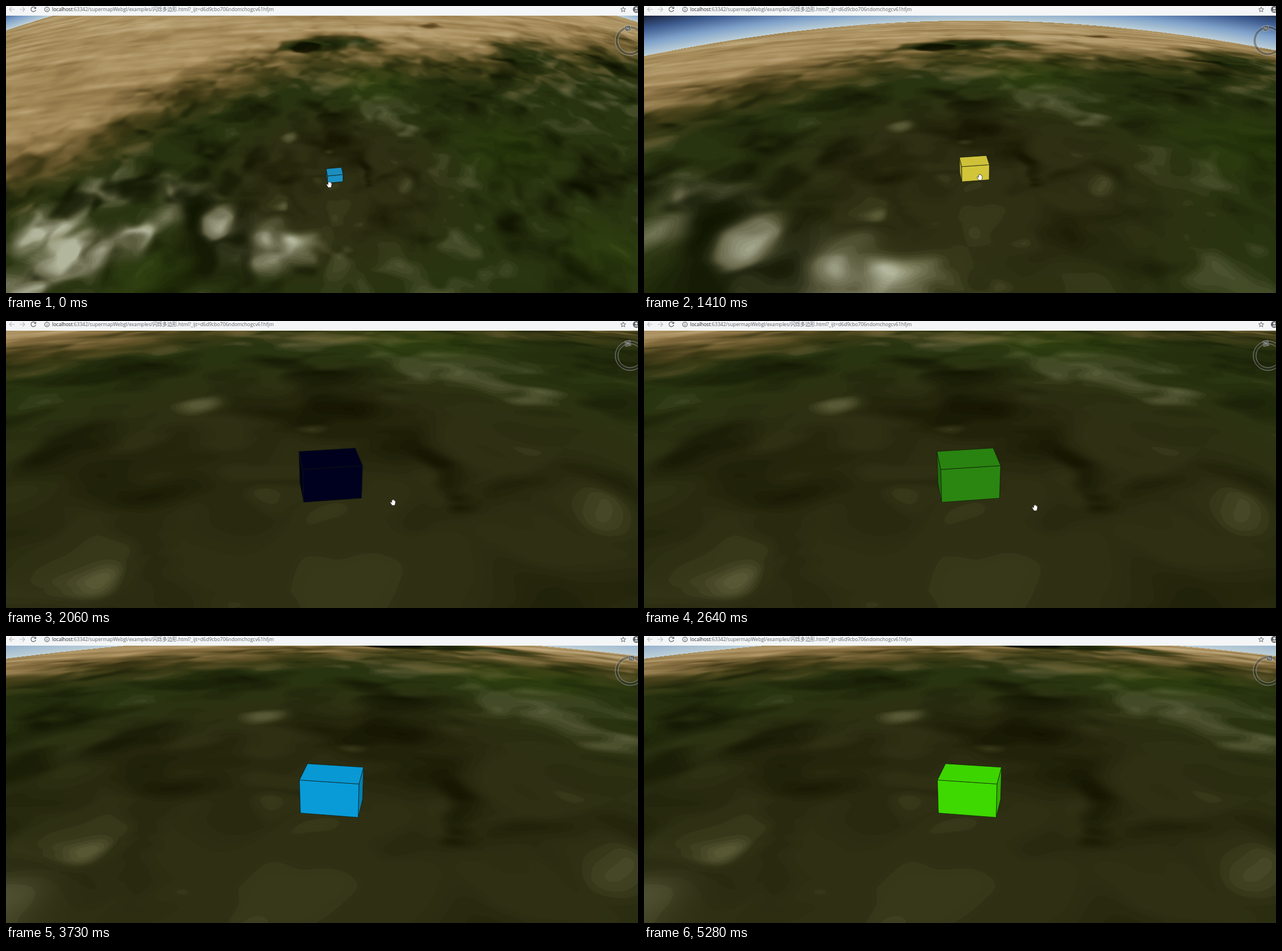
These frames come from a looping animation (1110x505 px, 5.38 s). An HTML page with a canvas:

```html
<!DOCTYPE html>
<html lang="zh">
<head>
<meta charset="utf-8">
<title>闪烁多边形</title>
<style>
  html, body { margin: 0; width: 100%; height: 100%; overflow: hidden; background: #000; }
  canvas, svg { position: absolute; left: 0; top: 0; display: block; }
  canvas { top: 17px; }
  text { font-family: "Open Sans", "Noto Sans", "Noto Sans CJK SC", "Noto Sans CJK", sans-serif; }
</style>
</head>
<body>
<canvas id="globe" width="1110" height="488"></canvas>
<svg width="1110" height="505" viewBox="0 0 1110 505">
  <g fill="none" stroke="#d4d6d2" stroke-opacity=".55">
    <circle cx="1096" cy="61" r="23.5" stroke="#303532" stroke-width="5" stroke-opacity=".4"/>
    <circle cx="1096" cy="61" r="26"/>
    <circle cx="1096" cy="61" r="21"/>
    <g id="north">
      <rect x="1091.5" y="34.5" width="9" height="9" fill="#454a47" fill-opacity=".85"/>
      <text x="1096" y="42" font-size="8" text-anchor="middle" fill="#f0f0f0" stroke="none">N</text>
    </g>
  </g>

  <g id="box" stroke="#10180c" stroke-width=".7" stroke-linejoin="round"></g>

  <g id="tilt" transform="translate(568 306)" fill="none" stroke="#c2c6b4" stroke-width="1.3">
    <ellipse rx="10.5" ry="4.5"/>
    <path d="M0 -6V6M-2 -4L0 -6.5L2 -4M-2 4L0 6.5L2 4M-8 -1l-3 1l3 2M8 -1l3 1l-3 2"/>
  </g>
  <path id="hand" fill="#fff" stroke="#222" stroke-width=".7" stroke-linejoin="round"
    d="M-4 -1L-2.4 .6V-3.6Q-1.6 -4.8 -.8 -3.6V-4.6Q0 -5.8 .8 -4.6V-3.8Q1.6 -4.8 2.4 -3.6V-2.4Q3.4 -3.2 4 -2V1Q3.6 4 2.4 5.6H-2Q-3.2 3.4 -5 .6Q-5.2 -1 -4 -1Z"/>

  <rect width="1110" height="17" fill="#f3f5f6"/>
  <g fill="none" stroke="#b7babd" stroke-width="1.1">
    <path d="M15 6H6M10 2L6 6L10 10M24 6H33M29 2L33 6L29 10"/>
    <g stroke="#54585c">
      <path d="M51.4 3.2A4.2 4.2 0 1 0 52.2 6.8M52.4 1.5V4.4H49.4"/>
      <circle cx="72" cy="6" r="4"/>
      <path d="M72 5.4V8.3M72 3.4V4.4"/>
      <path stroke-width=".9" d="M1084 1.8L1085.2 4.8L1088.4 5L1086 7.1L1086.8 10.2L1084 8.5L1081.2 10.2L1082 7.1L1079.6 5L1082.8 4.8Z"/>
    </g>
  </g>
  <circle cx="1107" cy="6" r="6" fill="#5f6368"/>
  <circle cx="1107" cy="4.3" r="2" fill="#f3f5f6"/>
  <path d="M1103 9.4Q1107 5.6 1111 9.4Z" fill="#f3f5f6"/>
  <text x="81" y="9" font-size="8.6" fill="#5f6368"><tspan fill="#202124">localhost</tspan>:63342/supermapWebgl/examples/闪烁多边形.html?_ijt=d6d9cbo706ndomchogcv61hfjm</text>
</svg>

<script>
const W = 1110, H = 488, TOP = 17, FOCAL = 984, LOOP = 5380;
const $ = id => document.getElementById(id);
const clamp = v => v < 0 ? 0 : v > 1 ? 1 : v;
const mix = (a, b, f) => a + (b - a) * f;

// The picture changes on these beats only; each track is read at the latest beat.
const beats = [0, 1150, 1410, 1720, 2060, 2360, 2640, 2940, 3200, 3460, 3730, 3980, 4230, 4500, 4750, 5030, 5280];

// time, box x, box y, distance in globe radii, tilt, heading
const flight = [
  [0, 577, 304, .227, 47, 0],
  [1150, 577, 305, .227, 59.1, 0],
  [1410, 580, 299, .128, 59.4, 0],
  [2060, 569, 298, .0613, 60.5, 0],
  [2640, 569, 298, .0613, 60.5, 0],
  [2940, 571, 299, .0613, 62, 12],
  [3200, 573, 299, .0613, 62.3, 17]
];
// time, red, green, blue
const flash = [
  [0, 28, 145, 196], [1150, 169, 210, 100], [1410, 210, 197, 58], [2060, 0, 0, 31],
  [2940, 63, 203, 9], [3730, 8, 155, 216], [5280, 62, 217, 0]
];
// time, x, y
const drag = [
  [0, 568, 314], [1150, 568, 314], [1410, 590, 301], [2060, 680, 319],
  [2360, 727, 322], [2940, 644, 335], [3460, 958, 491]
];
function read(track, t) {
  const next = track.findIndex(key => key[0] > t);
  if (next < 0) return track[track.length - 1].slice(1);
  const a = track[next - 1], b = track[next], f = (t - a[0]) / (b[0] - a[0]);
  return a.slice(1).map((v, i) => mix(v, b[i + 1], f));
}

function cameraAt(t) {
  const [x, y, dist, tilt, heading] = read(flight, t);
  const a = tilt * Math.PI / 180, b = heading * Math.PI / 180;
  return { x, y, dist, heading, st: Math.sin(a), ct: Math.cos(a), sh: Math.sin(b), ch: Math.cos(b) };
}

// Casts a ray; sets gx, gy (hundredths of a radius) and returns -1, or returns the height above the limb.
let gx = 0, gy = 0;
function cast(v, x, y) {
  const dx = x - v.x, up = v.y - y;
  const dy = FOCAL * v.st + up * v.ct, dz = up * v.st - FOCAL * v.ct;
  const cy = -v.dist * v.st, cz = 1 + v.dist * v.ct;
  const a = dx * dx + dy * dy + dz * dz, b = cy * dy + cz * dz;
  const c = v.dist * (v.dist + 2 * v.ct), disc = b * b - a * c;
  if (disc < 0) return Math.sqrt(1 + c - b * b / a) - 1;
  const s = (-b - Math.sqrt(disc)) / a;
  const px = 100 * s * dx, py = 100 * (cy + s * dy);
  gx = px * v.ch - py * v.sh;
  gy = px * v.sh + py * v.ch;
  return -1;
}

// Inverse of cast for points near the box
function project(v, X, Y, Z) {
  const x = (X * v.ch + Y * v.sh) / 100;
  const y = (Y * v.ch - X * v.sh) / 100 + v.dist * v.st, z = Z / 100 - v.dist * v.ct;
  const k = FOCAL / (y * v.st - z * v.ct);
  return [v.x + k * x, v.y - k * (y * v.ct + z * v.st)];
}

let seed = 4711;
const random = () => (seed = (Math.imul(seed, 1664525) + 1013904223) >>> 0) / 4294967296;
const lattice = Float32Array.from({ length: 65536 }, () => random() * 2 - 1);
function noise(x, y) {
  const ix = Math.floor(x), iy = Math.floor(y);
  let fx = x - ix, fy = y - iy;
  fx *= fx * (3 - 2 * fx);
  fy *= fy * (3 - 2 * fy);
  const x0 = ix & 255, x1 = (ix + 1) & 255, r0 = (iy & 255) << 8, r1 = ((iy + 1) & 255) << 8;
  return mix(mix(lattice[r0 + x0], lattice[r0 + x1], fx), mix(lattice[r1 + x0], lattice[r1 + x1], fx), fy);
}

// Landmarks are round on the ground and placed in the screen space of one view.
const RELIEF = 0, SAND = 1, RIDGE = 2, LUSH = 3;
const land = [];
function spot(view, kind, x, y, r, amount) {
  cast(view, x + r, y);
  const ex = gx, ey = gy;
  cast(view, x, y);
  land.push({ kind, cx: gx, cy: gy, r: Math.hypot(ex - gx, ey - gy), amount });
}
// Beads along a quadratic curve
function chain(view, kind, [x0, y0], [x1, y1], [x2, y2], r, amount) {
  for (let f = 0; f <= 1; f += .125) {
    const x = mix(mix(x0, x1, f), mix(x1, x2, f), f), y = mix(mix(y0, y1, f), mix(y1, y2, f), f);
    spot(view, kind, x, y, r * (.75 + .5 * random()), amount);
  }
}
const wide = cameraAt(0), near = cameraAt(LOOP);
spot(wide, RELIEF, 525, 72, 32, -1.2);
spot(wide, RELIEF, 745, 36, 24, -.5);
spot(wide, RELIEF, 702, 312, 32, .3);
spot(wide, RELIEF, 820, 180, 110, -.12);
spot(near, RELIEF, 592, 196, 34, .3);
spot(near, RELIEF, 462, 140, 60, .35);
spot(near, RELIEF, 478, 297, 55, .2);
spot(near, RELIEF, 105, 385, 80, .3);
chain(near, RELIEF, [750, 250], [830, 290], [820, 370], 55, -.14);
chain(near, RELIEF, [400, 175], [230, 300], [230, 480], 70, -.09);
chain(wide, SAND, [490, 72], [570, 60], [640, 66], 45, -.9);
spot(wide, SAND, 915, 84, 80, -1.5);
chain(wide, RIDGE, [60, 400], [150, 290], [330, 325], 60, .6);
chain(wide, RIDGE, [320, 335], [350, 410], [490, 430], 75, .7);
chain(wide, RIDGE, [20, 495], [100, 440], [230, 410], 60, .6);
spot(wide, LUSH, 645, 132, 100, .8);
spot(wide, LUSH, 880, 250, 130, .8);
spot(wide, LUSH, 1060, 430, 120, .7);
spot(wide, LUSH, 250, 485, 110, .8);

// Dark, middle and light tone of each ground cover
const tones = {
  green: [[14, 18, 0], [41, 52, 16], [128, 128, 92]],
  olive: [[20, 20, 0], [48, 48, 20], [128, 126, 84]],
  lush: [[20, 32, 2], [48, 66, 15], [84, 108, 48]],
  earth: [[46, 36, 10], [98, 80, 36], [172, 138, 84]],
  sand: [[92, 70, 32], [164, 137, 88], [218, 202, 164]],
  ridge: [[24, 30, 10], [96, 95, 66], [178, 182, 156]]
};
const MID = .45;
const tone = ([lo, mid, hi], h, i) =>
  h < MID ? mix(lo[i], mid[i], h / MID) : mix(mid[i], hi[i], (h - MID) / (1 - MID));

const sum = new Float64Array(4);
const cover = new Float64Array(5);
const covers = [tones.olive, tones.lush, tones.earth, tones.sand, tones.ridge];
function groundColour(out, o) {
  const X = gx + .25 * noise(gx / .7 + 40, gy / .7), Y = gy + .25 * noise(gx / .7, gy / .7 + 80);
  const n = .35 * noise(X / 2.4, Y / 2.4) + .45 * noise(X / 1.1 + 31, Y / 1.1)
    + .25 * noise(X / .5, Y / .5 + 57);
  sum.fill(0);
  for (const b of land) {
    const dx = X - b.cx, dy = Y - b.cy, q = 1 - (dx * dx + dy * dy) / (b.r * b.r);
    if (q > 0) sum[b.kind] += b.amount * q * q;
  }
  const west = Math.max(0, -gx - 2), east = Math.max(0, gx - 9);
  const dry = (gy - 8.5 + .8 * west - .5 * east) / 2.5 + n + sum[SAND];
  const arid = clamp(dry), ridge = clamp(sum[RIDGE] * (.8 + 1.2 * n));
  cover[0] = .9 * clamp(1.3 - (gx * gx + gy * gy) / 25);
  cover[1] = clamp(sum[LUSH]);
  cover[2] = clamp(dry * .5 + .25);
  cover[3] = clamp(dry * .6 - .4);
  cover[4] = ridge;

  // Level plains with separate dark and light patches
  const patch = Math.sign(n) * Math.max(0, Math.abs(n) - .07);
  let h = .42 + mix(patch * .5, n * .12, arid) + ridge * (.16 + .7 * n) + sum[RELIEF];
  h += arid * (.13 * noise(gx / 4, gy / .6) + .06 * noise(gx / 1.2, gy / .3) + .1 * clamp((gy - 5) / 8));
  h = clamp(mix(Math.round(h * 18) / 18, h, .2 + .6 * arid));
  for (let i = 0; i < 3; i++) {
    let c = tone(tones.green, h, i);
    for (let k = 0; k < 5; k++) if (cover[k]) c = mix(c, tone(covers[k], h, i), cover[k]);
    out[o + i] = c;
  }
}

const air = [[0, 190, 208, 215], [.007, 126, 161, 202], [.014, 60, 90, 142], [.02, 25, 34, 58], [.03, 0, 0, 0]];
function skyColour(out, o, alt) {
  let k = 1;
  while (k < air.length - 1 && alt > air[k][0]) k++;
  const a = air[k - 1], b = air[k], f = clamp((alt - a[0]) / (b[0] - a[0]));
  for (let i = 1; i < 4; i++) out[o + i - 1] = mix(a[i], b[i], f);
}

const stars = Array.from({ length: 14 }, () => {
  const side = random() * 2 - 1;
  return [555 + 555 * side, 22 + random() * (10 + 70 * side * side), 1 + random()];
});

const pen = $("globe").getContext("2d");
const shots = new Map();
function shoot(t) {
  const id = read(flight, t).join();
  if (shots.has(id)) return shots.get(id);
  const view = cameraAt(t), img = pen.createImageData(W, H), out = img.data;
  for (let y = 0, o = 0; y < H; y++) {
    for (let x = 0; x < W; x++, o += 4) {
      const alt = cast(view, x, y + TOP);
      if (alt < 0) groundColour(out, o);
      else skyColour(out, o, alt);
      out[o + 3] = 255;
    }
  }
  shots.set(id, img);
  return img;
}

// Box on the ground: half width, half depth, height, and its turn
const BOX = { w: .31, d: .215, h: .39, turn: 8 * Math.PI / 180 };
function drawBox(view, rgb) {
  const corner = (a, b, z) => {
    const x = a * BOX.w, y = b * BOX.d, c = Math.cos(BOX.turn), s = Math.sin(BOX.turn);
    return project(view, x * c - y * s, x * s + y * c, z * BOX.h);
  };
  const paint = light => `rgb(${rgb.map(v => Math.round(v * light)).join()})`;
  const face = (light, ...corners) =>
    `<polygon fill="${paint(light)}" points="${corners.map(p => corner(...p).map(v => v.toFixed(1))).join(" ")}"/>`;
  const flank = a => face(.82, [a, -1, 0], [a, -1, 1], [a, 1, 1], [a, 1, 0]);
  $("box").innerHTML = flank(-1) + flank(1)
    + face(1, [-1, -1, 0], [1, -1, 0], [1, -1, 1], [-1, -1, 1])
    + face(.98, [-1, -1, 1], [1, -1, 1], [1, 1, 1], [-1, 1, 1]);
}

const show = (id, on) => $(id).setAttribute("visibility", on ? "visible" : "hidden");
let shown = -1;
function draw(time) {
  const t = beats.filter(b => b <= time).pop();
  if (t === shown) return;
  shown = t;
  const view = cameraAt(t), [x, y] = read(drag, t);
  pen.putImageData(shoot(t), 0, 0);
  pen.fillStyle = "#6a7074";
  for (const [sx, sy, size] of stars) {
    if (cast(view, sx, sy) > .03) pen.fillRect(sx, sy - TOP, size, size);
  }
  drawBox(view, read(flash, t));
  show("tilt", t >= 2940 && t < 3200);
  show("hand", t < 3730);
  $("hand").setAttribute("transform", `translate(${x} ${y})`);
  $("north").setAttribute("transform", `rotate(${view.heading - 10} 1096 61)`);
}

// Later views are prepared one per tick while the first is on screen.
let ready = 0;
function tick() {
  draw(performance.now() % LOOP);
  if (ready < beats.length) shoot(beats[ready++]);
  requestAnimationFrame(tick);
}
tick();
</script>
</body>
</html>
```
